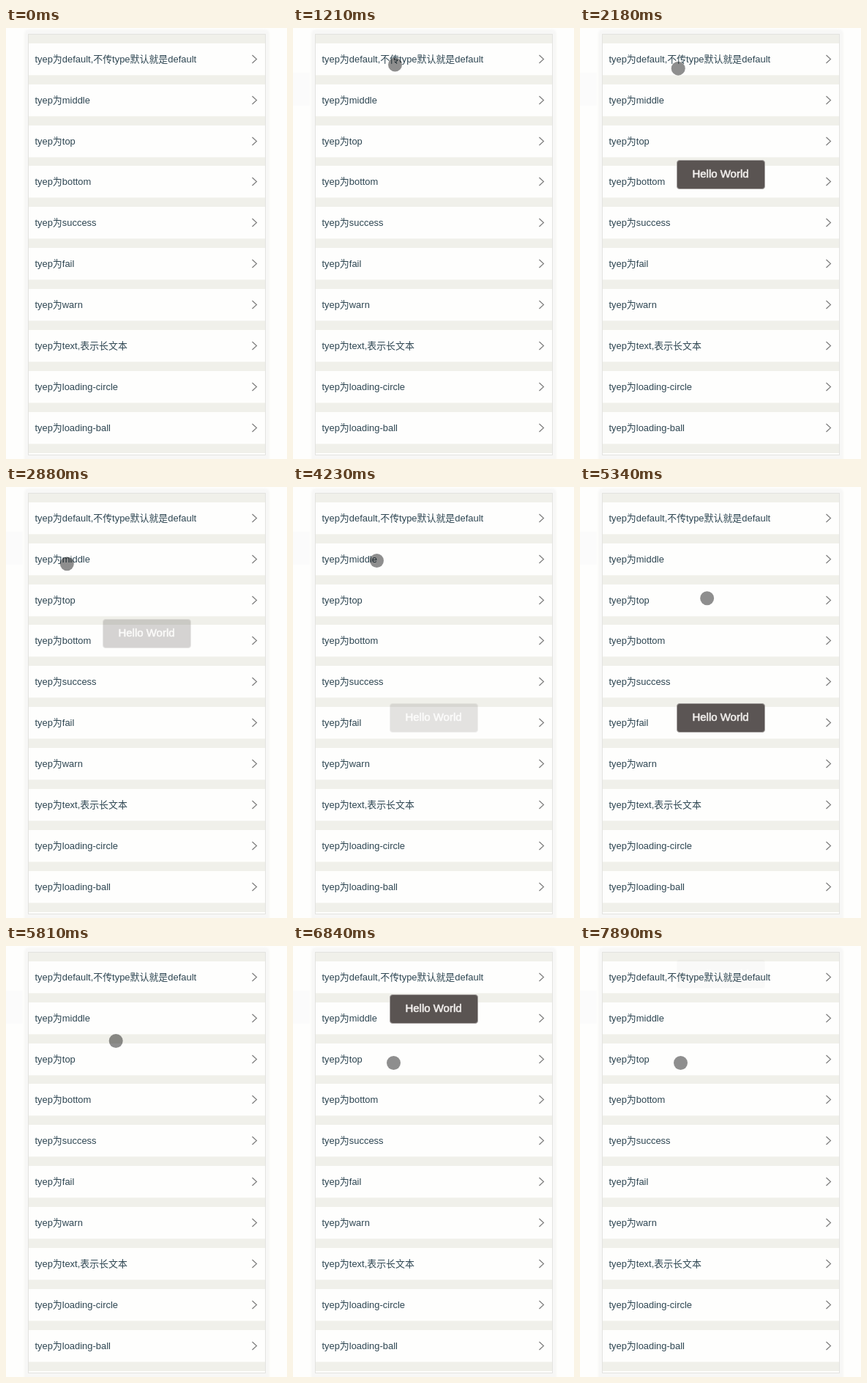
An HTML page that plays this animation: 384x588 px, repeating every 8000 ms.

```html
<!DOCTYPE html>
<html lang="zh-CN">
<head>
<meta charset="utf-8">
<title>Toast</title>
<style>
  html, body { margin: 0; width: 100%; height: 100%; overflow: hidden; background: #fefefd; }
  svg { display: block; width: 384px; height: 588px; }
  text { font-family: "Liberation Sans", Arial, "Noto Sans CJK SC", "Noto Sans CJK", sans-serif; }
  .halo { fill: #f7f7f6; filter: blur(1px); }
  .panel { fill: #f0f0ea; stroke: #e3e3e0; }
  .label { font-size: 12.95px; font-weight: 300; fill: #2e4652; }
  .arrow { fill: none; stroke: #777; stroke-width: 1.1; }
  #toast rect { fill: #5a5452; stroke: #a5a1a0; }
  #toast text { font-size: 15px; fill: #f3f0ee; stroke: #f3f0ee; stroke-width: .55; text-anchor: middle; }
</style>
</head>
<body>
<svg viewBox="0 0 384 588">
  <rect id="smudge" y="61" width="23" height="45" fill="#fbfbfb"/>
  <rect class="halo" x="25" y="2" width="335" height="600" rx="6"/>
  <rect class="panel" x="30.5" y="8.5" width="324" height="574"/>
  <rect x="31" y="580" width="323" height="2" fill="#fefefd"/>
  <g id="rows"></g>
  <g id="toast">
    <rect x="132.5" y=".5" width="120" height="39" rx="3.5"/>
    <text x="192" y="24.4">Hello World</text>
  </g>
  <circle id="cursor" r="9.5" fill="#000" fill-opacity=".44"/>
</svg>
<script>
const LOOP = 8000, FADE = 300;
const $ = id => document.getElementById(id);

const labels = ['default,不传type默认就是default', 'middle', 'top', 'bottom', 'success',
  'fail', 'warn', 'text,表示长文本', 'loading-circle', 'loading-ball'];
$('rows').innerHTML = labels.map((label, i) => `
  <g transform="translate(0 ${Math.floor(i * 55.9 + .25)})">
    <rect x="31" y="21" width="323" height="43.3" fill="#fefefd"/>
    <text class="label" x="39.4" y="47">tyep为${label}</text>
    <path class="arrow" d="M336.5 37l6 5.5l-6 5.5"/>
  </g>`).join('');

const toasts = [
  { from: 1600, to: 2745, top: 180, slide: 0 },
  { from: 4190, to: 5335, top: 295, slide: 0 },
  { from: 6540, to: 7650, top: 66, slide: 49 }
];

// Pointer strokes; bend pushes the curve sideways by a share of its length
const strokes = [
  { from: 500, to: 1210, x: 139.5, y: 50, bend: .1 },
  { from: 2130, to: 3000, x: 82, y: 106, bend: 0 },
  { from: 3220, to: 3540, x: 114.5, y: 100.5, bend: .3 },
  { from: 4430, to: 4700, x: 90.5, y: 265.5, bend: 0 },
  { from: 4700, to: 4990, x: 340, y: 327, bend: .9 },
  { from: 4990, to: 5500, x: 151.5, y: 128.5, bend: 0 },
  { from: 5800, to: 6220, x: 137.5, y: 159.5, bend: .3 }
];

const clamp = p => Math.min(1, Math.max(0, p));

// Standard CSS "ease" curve, solved by bisection
function ease(p) {
  p = clamp(p);
  let lo = 0, hi = 1, u;
  for (let i = 0; i < 20; i++) {
    u = (lo + hi) / 2;
    if (.75 * u * (1 - u) + u ** 3 < p) lo = u; else hi = u;
  }
  return .3 * u * (1 - u) ** 2 + 3 * u * u * (1 - u) + u ** 3;
}

function pointer(t) {
  let x = 0, y = 97;
  for (const s of strokes) {
    if (t < s.from) break;
    const u = Math.sin(clamp((t - s.from) / (s.to - s.from)) * Math.PI / 2);
    const dx = s.x - x, dy = s.y - y, side = 2 * u * (1 - u) * s.bend;
    x += dx * u - dy * side;
    y += dy * u + dx * side;
  }
  return [x, y];
}

function show(id, visible) {
  $(id).style.display = visible ? '' : 'none';
}

function draw(t) {
  const [x, y] = pointer(t);
  show('cursor', t >= 500);
  show('smudge', t >= 620);
  $('cursor').setAttribute('transform', `translate(${x} ${y})`);

  const active = toasts.find(n => t >= n.from && t < n.to + FADE);
  show('toast', active);
  if (active) {
    const { from, to, top, slide } = active;
    const shown = ease((t - from) / FADE) - ease((t - to) / FADE);
    $('toast').setAttribute('opacity', shown);
    $('toast').setAttribute('transform', `translate(0 ${top - slide * (1 - shown)})`);
  }
}

const start = performance.now();
function tick() {
  draw((performance.now() - start) % LOOP);
  requestAnimationFrame(tick);
}
tick();
</script>
</body>
</html>
```
